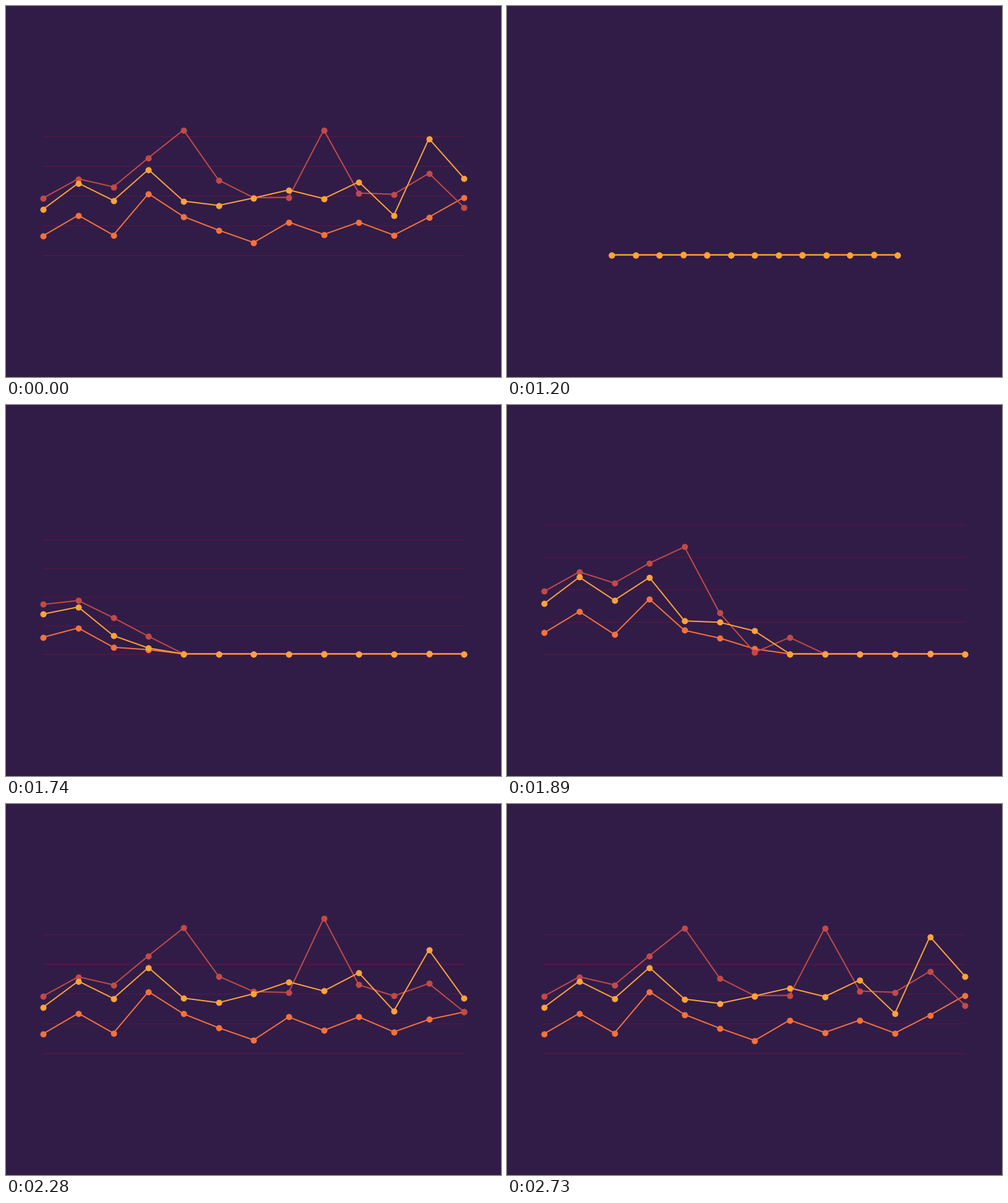
A matplotlib script that plays this animation: 800x600 px, repeating every 3.23 s.

```python
import numpy as np
import matplotlib.pyplot as plt
from matplotlib.animation import FuncAnimation

W, H, DPI = 800, 600, 100
LOOP, TICK = 3230, 10           # ms
STEP = 30                       # the motion advances every 30 ms
POSTER_END, START, END = 100, 600, 2730
PX = 72 / DPI                   # points per pixel

BG, GRID = "#311c48", "#5c1840"
RED, ORANGE, YELLOW = "#c14a47", "#f4723b", "#fba33c"

CENTER_X, HALF, BASE = 400.2, 340, 402.5
RADIUS = 5
GRID_BASE, GRID_GAP = 403.5, 48

# Start time of each point's rise
RISE_A = np.array([1590, 1643, 1697, 1732, 1801, 1796, 1837,
                   1935, 1965, 1985, 2042, 2125, 2171])
RISE_B = np.array([1590, 1633, 1666, 1718, 1744, 1813, 1887,
                   1854, 1898, 1967, 2106, 2136, 2132])

# colour, heights above the base line, rise times (back to front)
SERIES = [
    (ORANGE, [31, 64, 32, 99, 62, 40, 20, 53, 33, 53, 32, 61, 93], RISE_A),
    (RED, [92, 123, 110, 157, 202, 121, 92.5, 93, 202, 100, 98, 132, 77], RISE_B),
    (YELLOW, [74, 116, 88, 138, 87, 80, 92, 105, 91, 118, 64, 188, 124], RISE_A),
]


def progress(t, start, length):
    return np.clip((t - start) / length, 0, 1)


def back_out(p, s=1.70158):
    u = p - 1
    return 1 + (s + 1) * u**3 + s * u**2


def expo_out(p):
    return (1 - 2 ** (-10 * p)) / (1 - 2**-10)


fig = plt.figure(figsize=(W / DPI, H / DPI), dpi=DPI, facecolor=BG)
ax = fig.add_axes([0, 0, 1, 1])
ax.set_xlim(0, W)
ax.set_ylim(H, 0)
ax.axis("off")

rules = [ax.plot([60, 741], [GRID_BASE] * 2, color=GRID, lw=PX, snap=False,
                 solid_capstyle="butt")[0] for _ in range(5)]

plots = []
for color, heights, rise in SERIES:
    line, = ax.plot([], [], color=color, lw=2 * PX, snap=False,
                    solid_joinstyle="round")
    dots, = ax.plot([], [], "o", color=color, mew=0)
    plots.append((line, dots, np.array(heights), rise))

spots = np.linspace(-HALF, HALF, 13)


def draw(i):
    ms = i * TICK
    if ms < POSTER_END:
        t = END
    elif ms < START:
        t = 0
    else:
        t = min(END, START + (ms - START) // STEP * STEP)

    size = back_out(progress(t, 568, 540))
    spread = expo_out(progress(t, 1111.5, 540))
    lift = back_out(progress(t, 1584, 460))

    for k, rule in enumerate(rules):
        rule.set_visible(t > 1584)
        rule.set_ydata([GRID_BASE - k * GRID_GAP * lift] * 2)

    x = CENTER_X + spots * spread
    for line, dots, heights, rise in plots:
        y = BASE - heights * back_out(progress(t, rise, 540))
        line.set_data(x, y)
        line.set_visible(spread > 0)
        if spread > 0:
            dots.set_data(x, y)
        else:
            dots.set_data(x[:1], y[:1])
        dots.set_markersize(2 * RADIUS * max(size, 0.01) * PX)
        dots.set_visible(t > 0)
    return []


anim = FuncAnimation(fig, draw, frames=LOOP // TICK, interval=TICK,
                     repeat=True, repeat_delay=0, blit=False)
plt.show()
```
